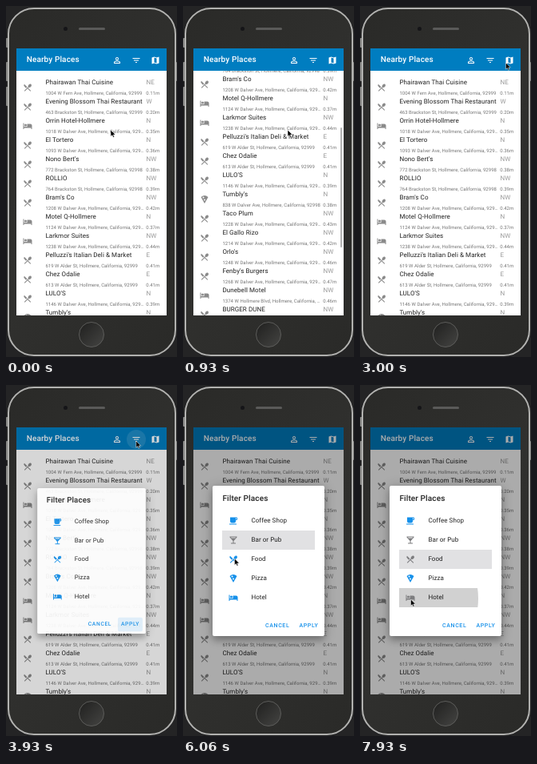
Recreate the animation shown at these times as an HTML page. Size 214 by 439 pixels, loop 8 s.

```html
<!DOCTYPE html>
<html lang="en">
<head>
<meta charset="utf-8">
<title>Nearby Places</title>
<style>
html, body { margin: 0; width: 100%; height: 100%; overflow: hidden; background: #242425; }
body { font-family: Roboto, Arial, sans-serif; text-rendering: geometricPrecision; }
div, span, svg { position: absolute; box-sizing: border-box; white-space: nowrap; }
svg { overflow: visible; fill: currentColor; fill-rule: evenodd; }
#stage { left: 0; top: 0; width: 214px; height: 439px; overflow: hidden; }
.key { width: 3px; height: 24px; border-radius: 1px; background: #858583; }
#body { left: 1.5px; top: 1.5px; width: 211px; height: 436px; border-radius: 33px; background: linear-gradient(125deg, #2a2a28, #30302e 50%, #2a2a28); border: 2.3px solid #b2b2b0; }
#lens { left: 71.5px; top: 25.5px; width: 5px; height: 5px; border-radius: 50%; background: #151518; }
#speaker { left: 91px; top: 26.5px; width: 33px; height: 3px; border-radius: 2px; background: #5a5a59; }
#home { left: 91px; top: 395px; width: 32px; height: 32px; border-radius: 50%; background: linear-gradient(135deg, #20201f, #444442); border: 1px solid #5c5c5a; }
#screen { left: 13.4px; top: 53px; width: 187.6px; height: 333.5px; overflow: hidden; background: #fff; }
#view { left: 0; top: 28px; width: 188px; height: 306px; overflow: hidden; }
#list { left: 0; top: 0; width: 188px; }
.row { left: 0; width: 188px; height: 24px; }
.row svg { left: 8px; top: 0; color: #8a8a8a; }
.name, .dir { top: -6px; font-size: 8px; line-height: 12px; letter-spacing: .009375em; }
.name { left: 36px; color: rgba(0,0,0,.87); }
.dir { left: 162px; color: rgba(0,0,0,.4); }
.addr, .dist { top: 9.5px; font-size: 6px; line-height: 10px; letter-spacing: .03px; color: rgba(0,0,0,.54); }
.addr { left: 36px; width: 124.5px; overflow: hidden; text-overflow: ellipsis; }
.dist { left: 161.8px; }
#thumb { left: 183.6px; top: 0; width: 2px; height: 150px; border-radius: 1px; background: rgba(0,0,0,.3); }
#bar { left: 0; top: 0; width: 188px; height: 28px; background: #007dc0; color: #fff; }
#bar span { left: 12.3px; top: 8px; font-size: 10px; line-height: 14px; font-weight: 500; letter-spacing: .0125em; }
#bar svg { top: 8.5px; }
#press { left: 137.6px; top: 2.5px; width: 24px; height: 24px; border-radius: 50%; background: #fff; }
#scrim { left: 0; top: 0; width: 188px; height: 334px; background: #000; }
#dialog { left: 24px; top: 72.8px; width: 140px; height: 188.4px; border-radius: 2px; background: #fff; box-shadow: 0 5px 8px rgba(0,0,0,.24), 0 2px 16px rgba(0,0,0,.2); }
#dialog h1 { position: absolute; margin: 0; left: 12px; top: 9.8px; font-size: 10px; line-height: 14px; font-weight: 500; letter-spacing: .0125em; color: rgba(0,0,0,.87); white-space: nowrap; }
.opt { left: 12px; width: 116px; height: 24px; overflow: hidden; color: #1590ea; }
.opt svg { left: 8px; top: 6px; }
.opt span { left: 36px; top: 6.2px; font-size: 8px; line-height: 12px; letter-spacing: .009375em; color: rgba(0,0,0,.87); }
.focus { left: 0; top: 0; width: 116px; height: 24px; background: #0a0a1e; opacity: 0; }
.ripple { border-radius: 50%; background: #000; opacity: 0; }
.btn { top: 166.6px; height: 18px; line-height: 18px; border-radius: 2px; font-size: 7px; font-weight: 500; letter-spacing: .0893em; text-align: center; color: #1590ea; }
#cancel { left: 61.7px; width: 38.3px; }
#apply, #glow { left: 104px; width: 32px; }
#glow { background: #1590ea; }
#cursor { left: 0; top: 0; }
</style>
</head>
<body>
<div id="stage">
  <div class="key" style="left:0;top:40px;height:12px"></div>
  <div class="key" style="left:0;top:70px"></div>
  <div class="key" style="left:0;top:101px"></div>
  <div class="key" style="right:0;top:70px"></div>
  <div id="body"></div>
  <div id="lens"></div>
  <div id="speaker"></div>
  <div id="home"></div>
  <div id="screen">
    <div id="view"><div id="list"></div><div id="thumb"></div></div>
    <div id="bar"><div id="press"></div><span>Nearby Places</span></div>
    <div id="scrim"></div>
    <div id="dialog">
      <h1>Filter Places</h1>
      <div class="btn" id="glow"></div>
      <div class="btn" id="cancel">CANCEL</div>
      <div class="btn" id="apply">APPLY</div>
    </div>
  </div>
  <svg id="cursor" width="7" height="10"><path d="M0 0V8.2L1.9 6.5 3.1 9.3 4.5 8.7 3.3 6H5.9Z" fill="#000" stroke="#fff" stroke-width=".5"/></svg>
</div>
<script>
const LOOP = 8000;
const $ = id => document.getElementById(id);

const disc = (x, y, r) => `M${x - r} ${y}a${r} ${r} 0 1 0 ${2 * r} 0a${r} ${r} 0 1 0 ${-2 * r} 0z`;
const icons = {
  food: 'M8.1 13.3l2.8-2.8-7-7a4 4 0 0 0 0 5.7zM14.9 11.5c1.5.7 3.7.2 5.3-1.4 1.9-1.9 2.3-4.6.8-6.1s-4.2-1.1-6.1.8c-1.6 1.6-2.1 3.7-1.4 5.3L3.7 19.9l1.4 1.4 6.9-6.9 6.9 6.9 1.4-1.4-6.9-6.9z',
  hotel: 'M1 5h2v9h8V7h8a4 4 0 0 1 4 4v9h-2v-3H3v3H1z' + disc(7, 10, 3),
  pizza: 'M3 6Q12-2 21 6L12 22z' + disc(9, 7, 2) + disc(12, 13, 2),
  cafe: 'M2 19h18v2H2zM20 3H4v10a4 4 0 0 0 4 4h6a4 4 0 0 0 4-4v-3h2a2 2 0 0 0 2-2V5a2 2 0 0 0-2-2zm0 5h-2V5h2z',
  pub: 'M21 5V3H3v2l8 9v5H6v2h12v-2h-5v-5zM7.4 7L5.7 5h12.6l-1.7 2z',
  map: 'M3 5l6-2 6 2 6-2v16l-6 2-6-2-6 2zM9 5v12l6 2V7z',
  person: disc(12, 8, 4) + disc(12, 8, 2.1) + 'M4 20v-3c0-5.3 16-5.3 16 0v3zM6 18h12v-1c0-2.8-12-2.8-12 0z',
  filter: 'M3 6h18v2H3zM6 11h12v2H6zM10 16h4v2h-4z'
};
const icon = (name, style = '') =>
  `<svg width="12" height="12" viewBox="0 0 24 24" style="${style}"><path d="${icons[name]}"/></svg>`;

// name | street | distance | direction | icon | zip
const places = `Phairawan Thai Cuisine|1004 W Fern Ave|0.11|NE
Evening Blossom Thai Restaurant|463 Brackston St|0.20|W
Orrin Hotel-Hollmere|1018 W Dalver Ave|0.35|N|hotel
El Tortero|1093 W Dalver Ave|0.36|N
Nono Bert's|772 Brackston St|0.38|NW||92998
ROLLIO|764 Brackston St|0.39|NW||92998
Bram's Co|1208 W Dalver Ave|0.42|NW
Motel Q-Hollmere|1124 W Dalver Ave|0.37|N|hotel
Larkmor Suites|1238 W Dalver Ave|0.44|NW|hotel
Pelluzzi's Italian Deli & Market|619 W Alder St|0.41|E
Chez Odalie|613 W Alder St|0.41|E
LULO'S|1146 W Dalver Ave|0.39|N
Tumbly's|838 W Dalver Ave|0.38|N|pizza|92998
Taco Plum|1228 W Dalver Ave|0.43|NW
El Gallo Rizo|1214 W Dalver Ave|0.42|NW
Orlo's|1248 W Dalver Ave|0.46|NW
Fenby's Burgers|1268 W Dalver Ave|0.47|NW
Dunebell Motel|1374 W Hollmere Blvd|0.46|NW|hotel
BURGER DUNE|1283 W Dalver Ave|0.48|NW`.split('\n').map(s => s.split('|'));

$('list').innerHTML = places.map(([name, street, dist, dir, kind, zip], i) =>
  `<div class="row" style="top:${14.5 + i * 24}px">${icon(kind || 'food')}
   <span class="name">${name.replace('&', '&amp;')}</span><span class="dir">${dir}</span>
   <span class="addr">${street}, Hollmere, California, ${zip || '92999'}</span><span class="dist">${dist}m</span></div>`
).join('');

['person', 'filter', 'map'].forEach((name, i) =>
  $('bar').insertAdjacentHTML('beforeend', icon(name, `left:${119.6 + i * 24}px`)));

// press: time of the tap; blur: time the row loses focus
const options = [
  { label: 'Coffee Shop', kind: 'cafe' },
  { label: 'Bar or Pub', kind: 'pub', press: 5240, blur: 6430 },
  { label: 'Food', kind: 'food', press: 6230, blur: LOOP },
  { label: 'Pizza', kind: 'pizza' },
  { label: 'Hotel', kind: 'hotel', press: 7800, blur: LOOP }
];
options.forEach((o, i) => {
  const el = document.createElement('div');
  el.className = 'opt';
  el.style.top = 32.2 + i * 24 + 'px';
  el.innerHTML = `<div class="focus"></div><div class="ripple"></div>${icon(o.kind)}<span>${o.label}</span>`;
  [o.focus, o.ripple, o.svg] = el.children;
  $('dialog').append(el);
});

// resting points: time, then position
const scroll = [[600, 0], [1030, 171], [1960, 0]];
const pointer = [[1820, 131, 155], [2320, 186, 67], [2460, 183.5, 71], [2940, 183.5, 71],
  [3400, 162, 70], [4140, 163, 70], [4620, 87, 198], [4740, 87, 198], [4800, 82, 200],
  [5100, 65, 195], [5640, 65, 195], [6060, 64.5, 217], [6620, 64.5, 217], [7200, 127, 280], [7660, 63.5, 268]];

const clamp = v => Math.max(0, Math.min(1, v));
const ramp = (t, a, b) => clamp((t - a) / (b - a));
const smooth = v => v * v * (3 - 2 * v);
const out = v => 1 - (1 - v) ** 3;

function track(keys, t, col = 1) {
  const n = keys.findIndex(k => k[0] > t);
  if (n < 0) return keys[keys.length - 1][col];
  if (!n) return keys[0][col];
  const a = keys[n - 1], b = keys[n];
  return a[col] + (b[col] - a[col]) * smooth(ramp(t, a[0], b[0]));
}

function drawOption(o, t) {
  const dt = t - o.press;
  const r = 8 + 98 * ramp(dt, 0, 172);
  o.svg.style.color = dt >= 40 ? '#7d7d7f' : '';
  o.focus.style.opacity = .12 * ramp(dt, 200, 260) * (1 - ramp(t, o.blur, o.blur + 60));
  o.ripple.style.cssText = `left:${15.5 - r}px;top:${13 - r}px;width:${2 * r}px;height:${2 * r}px;` +
    `opacity:${.18 * ramp(dt, 0, 75) * (1 - ramp(dt, 330, 520))}`;
}

function draw(t) {
  const y = track(scroll, t);
  $('list').style.transform = `translateY(${-y}px)`;
  $('thumb').style.transform = `translateY(${y * .48}px)`;
  $('thumb').style.opacity = ramp(t, 560, 640) * (1 - ramp(t, 2080, 2250));

  const blur = 1 - ramp(t, 5420, 5540);
  $('press').style.transform = `scale(${.5 + .5 * out(ramp(t, 3520, 3730))})`;
  $('press').style.opacity = .12 * ramp(t, 3520, 3600) * blur;

  $('scrim').style.opacity = .33 * ramp(t, 3820, 4050);
  $('dialog').style.opacity = ramp(t, 3820, 3940);
  $('dialog').style.transform = `scale(${.8 + .2 * out(ramp(t, 3820, 4060))})`;
  $('glow').style.opacity = .13 * blur;
  options.filter(o => o.press).forEach(o => drawOption(o, t));

  $('cursor').style.transform = `translate(${track(pointer, t)}px,${track(pointer, t, 2)}px)`;
}

const start = performance.now();
function tick() {
  draw((performance.now() - start) % LOOP);
  requestAnimationFrame(tick);
}
tick();
</script>
</body>
</html>
```
